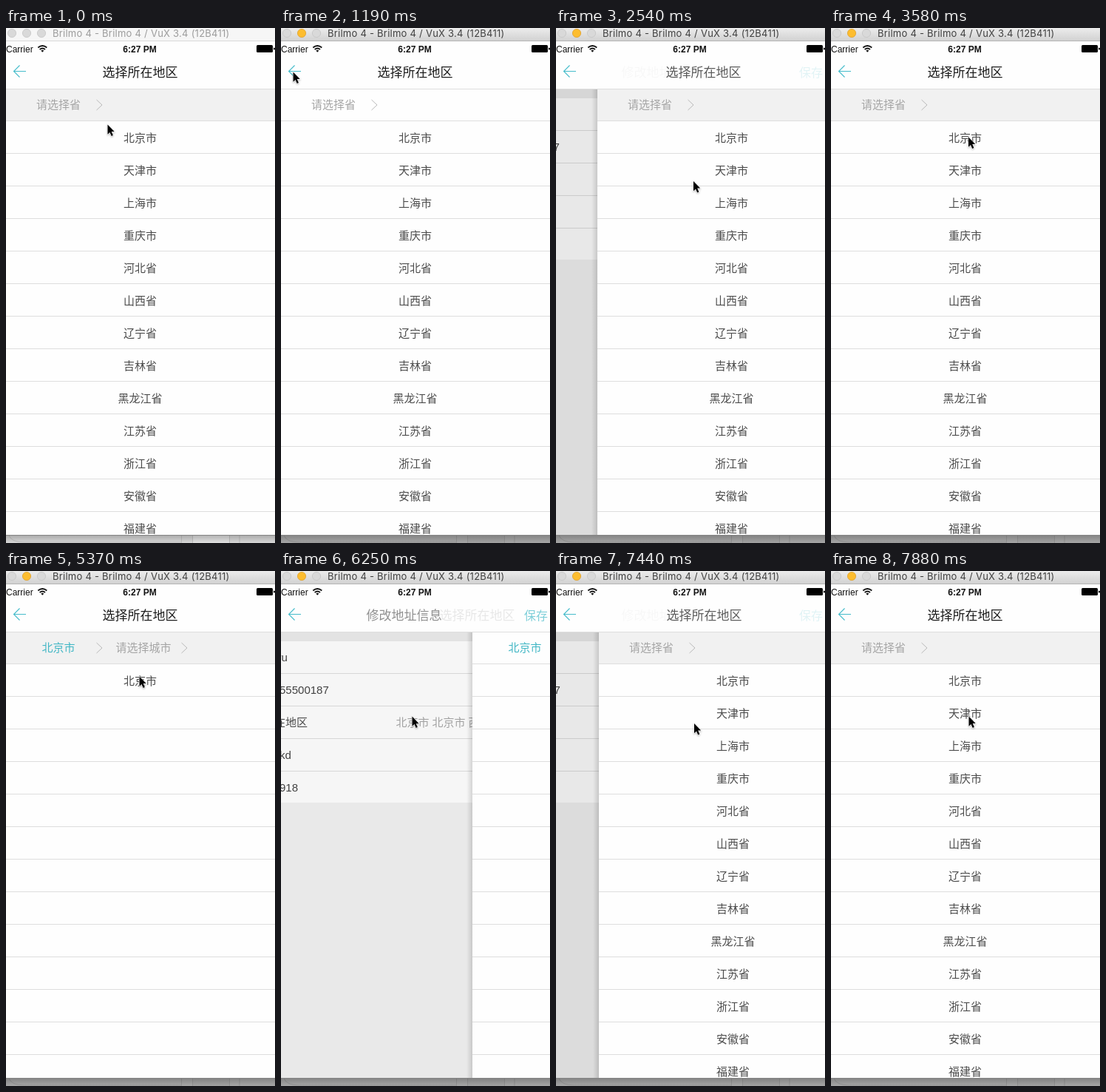
Recreate the animation shown at these times as an HTML page. Size 364 px wide and 696 px high, loop 8000 ms.

```html
<!DOCTYPE html>
<html lang="zh-CN">
<head>
<meta charset="utf-8">
<title>选择所在地区</title>
<style>
html, body { margin: 0; width: 100%; height: 100%; overflow: hidden; background: #fff; }
svg { display: block; width: 364px; height: 696px; }
text { font-family: "Liberation Sans", "Noto Sans CJK SC", "Noto Sans CJK", sans-serif; font-size: 15px; fill: #444; }
.cjk { font-family: "Noto Sans CJK SC", "Noto Sans CJK", sans-serif; font-weight: 300; fill: #4c4c4c; }
.mid { text-anchor: middle; }
.end { text-anchor: end; }
.nav { font-size: 17px; fill: #1c1c1c; }
.save { font-size: 16px; fill: #45bac8; }
.caption { font-family: Inter, "Open Sans", sans-serif; font-size: 13px; letter-spacing: .25px; }
.status { font-size: 12px; fill: #111; }
.line { fill: #dedede; }
.thin { fill: none; stroke: #bababa; stroke-width: 1; }
</style>
</head>
<body>
<svg id="stage" viewBox="0 0 364 696">
  <defs>
    <linearGradient id="bar" x2="0" y2="1">
      <stop offset="0" stop-color="#ececec"/><stop offset="1" stop-color="#d2d2d2"/>
    </linearGradient>
    <linearGradient id="shade" x2="0" y2="1">
      <stop offset="0" stop-opacity=".24"/><stop offset="1" stop-opacity=".03"/>
    </linearGradient>
    <linearGradient id="edge">
      <stop offset="0" stop-opacity="0"/><stop offset="1" stop-opacity=".14"/>
    </linearGradient>
    <clipPath id="view"><rect y="83" width="364" height="602"/></clipPath>
  </defs>

  <rect width="364" height="696" fill="#fefefe"/>

  <g id="desk">
    <rect id="deskFill" y="685" width="364" height="11"/>
    <rect id="deskPanel" x="253" y="685" width="49" height="11"/>
    <path d="M4 686q4 9 20 9H237M252.500 685v11M302.500 685v11M316 685v11M237.500 686v10" fill="none" stroke="#000" stroke-opacity=".11"/>
    <rect y="685" width="364" height="11" fill="url(#shade)"/>
    <rect y="685" width="364" height="1" fill="#858585"/>
  </g>

  <rect id="caption" width="364" height="17"/>
  <rect id="captionLine" y="17" width="364" height="1"/>
  <g id="lights"></g>
  <text id="captionText" class="caption" x="63" y="12">Brilmo 4 - Brilmo 4 / VuX 3.4 (12B411)</text>

  <text class="status" x="0" y="33">Carrier</text>
  <g fill="none" stroke="#111" stroke-width="1.7">
    <path d="M43.300 26.500q6-5 12 0M45.600 29q3.700-3 7.400 0"/>
    <path d="M47.300 30.500q2-1.500 4 0l-2 2.200z" fill="#111" stroke="none"/>
  </g>
  <text class="status mid" x="181" y="33" font-weight="bold">6:27 PM</text>
  <rect x="339" y="23" width="22" height="10" rx="1.500"/>
  <path d="M362 26.500q2 0 2 1.500t-2 1.500z"/>

  <g clip-path="url(#view)">
    <g id="form">
      <rect width="484" y="83" height="602" fill="#f1f1f1"/>
      <rect width="484" y="83" height="12" fill="#eaeaea"/>
      <rect width="484" y="95" height="218" fill="#fefefe"/>
      <g id="fields"></g>
      <text class="cjk" x="9" y="210">所在地区</text>
      <text id="area" class="cjk end" x="331.5" y="210" style="fill:#a8a8a8;word-spacing:.7px"></text>
      <path d="M346.500 198.500l6 6-6 6" fill="none" stroke="#bbb" stroke-width="1.800"/>
    </g>
    <rect id="dim" y="83" width="364" height="602"/>
    <g id="list">
      <rect id="shadow" x="-8" y="83" width="8" height="602" fill="url(#edge)"/>
      <rect y="83" width="364" height="602" fill="#fefefe"/>
      <rect id="strip" y="83" width="364" height="42"/>
      <g id="crumbs"></g>
      <g id="rows"></g>
    </g>
  </g>

  <rect class="line" y="82" width="364" height="1"/>
  <path d="M27 58.500H10.500M18.500 50.500l-8 8 8 8" fill="none" stroke="#45bccb" stroke-width="1.100"/>
  <text id="listTitle" class="cjk nav mid" x="181.500" y="66">选择所在地区</text>
  <text id="formTitle" class="cjk nav mid" x="181.500" y="66">修改地址信息</text>
  <text id="save" class="cjk save end" x="361" y="66">保存</text>

  <path id="pointer" d="M0 0v13.200l3-2.800 2.200 5 2.200-1-2.200-4.800h4z" stroke="#fff" stroke-width="1.100"
    paint-order="stroke" style="filter:drop-shadow(0 1px 1px rgba(0,0,0,.3))"/>
</svg>
<script>
// The list travels its own width plus its shadow
const LOOP = 8000, STEP = 148.7, TRAVEL = 372, PARALLAX = 109;
const $ = id => document.getElementById(id);
const set = (id, attrs) => {
  for (const key in attrs) $(id).setAttribute(key, attrs[key]);
};

const levels = [
  {
    rows: "北京市 天津市 上海市 重庆市 河北省 山西省 辽宁省 吉林省 黑龙江省 江苏省 浙江省 安徽省 福建省",
    crumbs: ["请选择省"]
  },
  { rows: "北京市", crumbs: ["北京市", "请选择城市"] },
  {
    rows: "东城区 西城区 崇文区 宣武区 朝阳区 丰台区 石景山区 海淀区 门头沟区 房山区 通州区 顺义区 昌平区",
    crumbs: ["北京市", "北京市", "请选择地区"]
  }
];

// time, x, y of the pointer tip
const path = [
  [0, 137.5, 130.5], [149, 137.5, 130.5], [760, 17, 59], [1190, 16.5, 59.5],
  [1636, 177.5, 227], [2090, 186, 207], [3123, 186, 207], [3569, 186, 147.5],
  [4030, 186, 147], [4461, 174, 107], [4758, 180, 141], [5353, 180.5, 142.5],
  [5800, 178, 192], [6097, 178, 195], [6543, 176, 201], [6691, 175.5, 204.5],
  [6990, 185, 207], [7435, 187, 206], [7881, 186.5, 196.5]
];

function pointerAt(t) {
  const i = path.findIndex(p => p[0] > t);
  if (i < 0) return path[path.length - 1].slice(1);
  const [a, b] = [path[i - 1], path[i]];
  const u = (t - a[0]) / (b[0] - a[0]);
  const ease = u * u * (3 - 2 * u);
  return [1, 2].map(k => a[k] + (b[k] - a[k]) * ease);
}

// Remaining share of a critically damped slide
function rest(ms) {
  const w = Math.max(0, ms) * 0.017;
  return (1 + w) * Math.exp(-w);
}

function coverAt(t) {
  if (t < 2330) return rest(t - 1200);
  if (t < 6103) return 1 - rest(t - 2330);
  if (t < 7240) return rest(t - 6103);
  return 1 - rest(t - 7240);
}

const levelAt = t => t < 3860 || t > 7000 ? 0 : t < 5490 ? 1 : 2;

$("fields").innerHTML = ["lanyu", "12055500187", "", "406kd", "900918"].map((value, i) => {
  const y = 95 + i * 44;
  const line = i ? `<rect class="line" x="9" y="${y - 1}" width="475" height="1"/>` : "";
  return `${line}<text x="6" y="${y + 27}">${value}</text>`;
}).join("");

let shown = -1;
function showLevel(n) {
  if (n === shown) return;
  shown = n;
  const { rows, crumbs } = levels[n];
  const names = rows.split(" ");
  let out = "";
  for (let i = 0; i < 13; i++) {
    const y = 125 + i * 44;
    out += `<rect class="line" y="${y}" width="364" height="1"/>
      <text class="cjk mid" x="181.5" y="${y + 28.5}">${names[i] || ""}</text>`;
  }
  $("rows").innerHTML = out;
  $("crumbs").innerHTML = crumbs.map((name, i) => {
    const x = 71 + i * 115;
    const color = i < crumbs.length - 1 ? "#42b7c5" : "#a5a5a5";
    const arrow = i < 2 ? `<path class="thin" d="M${x + 51.5} 97l7.500 7-7.500 7"/>` : "";
    return `<text class="cjk mid" x="${x}" y="109" style="fill:${color}">${name}</text>${arrow}`;
  }).join("");
}

function showWindow(active) {
  set("caption", { fill: active ? "url(#bar)" : "#f6f6f6" });
  set("captionLine", { fill: active ? "#b4b4b4" : "#dadada" });
  $("captionText").style.fill = active ? "#404040" : "#9c9c9c";
  set("deskFill", { fill: active ? "#acacac" : "#dedede" });
  set("deskPanel", { fill: active ? "#a8a8a8" : "#e8e8e8" });
  $("lights").innerHTML = [8, 28, 48].map((x, i) => {
    const [fill, edge] = active && i === 1 ? ["#fdbd2f", "#dfa02c"] : ["#d9d9d9", "#c6c6c6"];
    return `<circle cx="${x}" cy="7" r="5.600" fill="${fill}" stroke="${edge}" stroke-width=".8"/>`;
  }).join("");
}

let wasActive = null;
function draw(time) {
  const t = Math.floor((time % LOOP + 3) / STEP) * STEP;
  const cover = coverAt(t);
  const active = t > 740;
  if (active !== wasActive) showWindow(wasActive = active);

  showLevel(levelAt(t));
  const leaving = (t > 1180 && t < 2300) || (t > 6080 && t < 7200);
  set("strip", { fill: leaving ? "#fefefe" : "#f1f1f1" });
  set("list", { transform: `translate(${Math.round(TRAVEL * (1 - cover))} 0)` });
  set("shadow", { opacity: Math.min(1, cover * 4) });
  set("form", { transform: `translate(${-Math.round(PARALLAX * cover)} 0)` });
  set("dim", { opacity: cover * 0.1 });
  $("area").textContent = "北京市 北京市 " + (t < 5960 ? "崇文区" : "西城区");

  set("listTitle", { opacity: cover ** 2, transform: `translate(${Math.round(120 * (1 - cover))} 0)` });
  set("formTitle", { opacity: (1 - cover) ** 2, transform: `translate(${-Math.round(50 * cover)} 0)` });
  set("save", { opacity: 1 - cover });
  set("pointer", { transform: `translate(${pointerAt(t).join(" ")})` });
}

let start = null;
function tick(now) {
  if (start === null) start = now;
  draw(now - start);
  requestAnimationFrame(tick);
}
draw(0);
requestAnimationFrame(tick);
</script>
</body>
</html>
```
